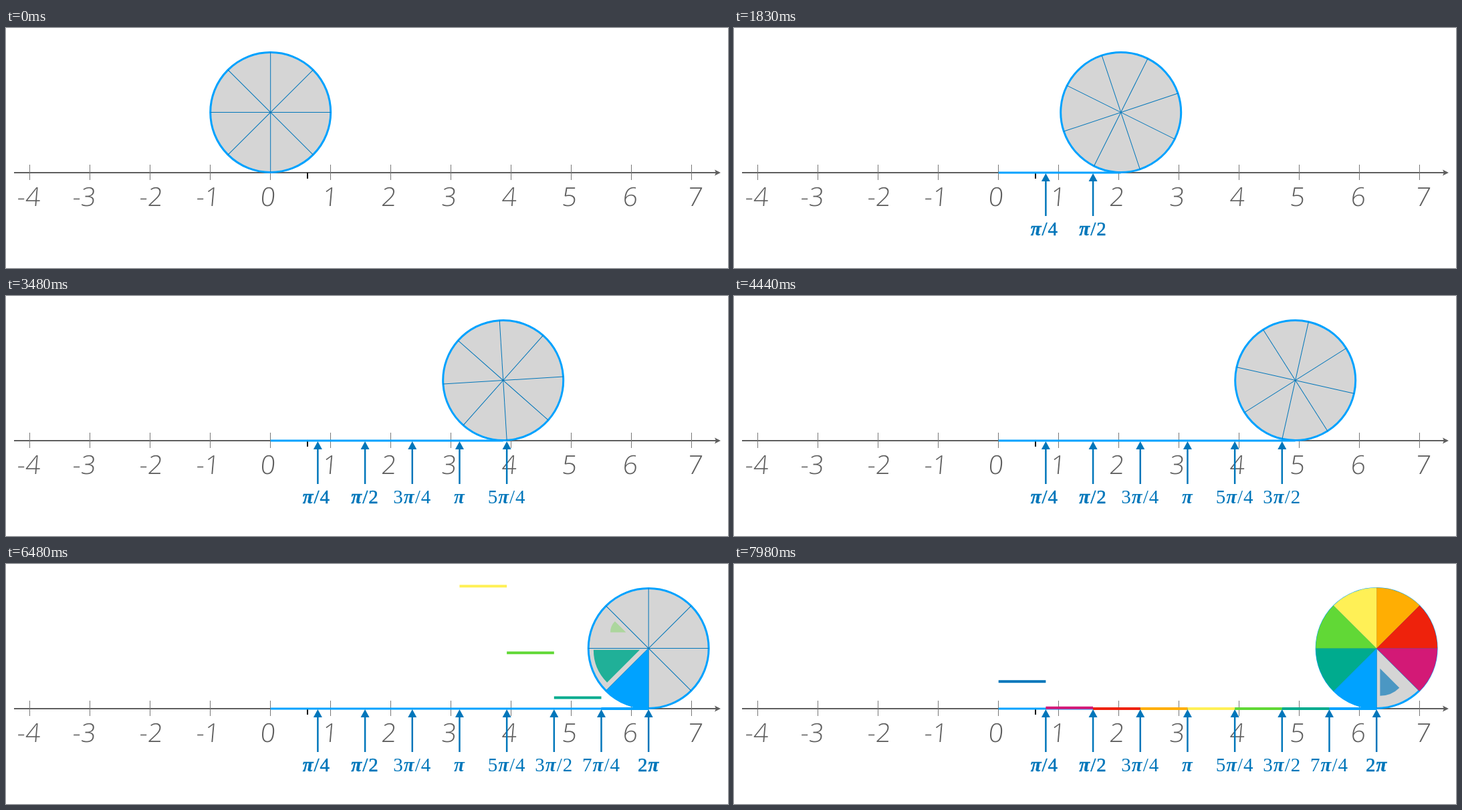
Write an HTML page that moves like this. It is 1080x360 px and loops after 8000 ms.

```html
<!DOCTYPE html>
<html lang="en">
<head>
<meta charset="utf-8">
<title>Unrolling a circle</title>
<style>
  html, body { margin: 0; width: 100%; height: 100%; overflow: hidden; background: #fff; }
  svg { display: block; width: 100%; height: 100%; }
  .num { font: 300 39px "Open Sans", sans-serif; fill: #5e5e5e; text-anchor: middle; }
  .label { font: 29px "Liberation Serif", serif; letter-spacing: 1px; text-anchor: middle; fill: #0076ba; }
  .label.strong { stroke: #0076ba; stroke-width: .5; }
  .pi { font-weight: bold; font-style: italic; }
</style>
</head>
<body>
<svg id="stage" viewBox="0 0 1080 360">
  <path d="M12 217H1062" stroke="#5e5e5e" stroke-width="2"/>
  <path d="M1069 217L1060 212.5L1062 217L1060 221.5Z" fill="#5e5e5e"/>
  <g id="scale"></g>
  <path d="M451 217V226" stroke="#000" stroke-width="2"/>
  <path id="trail" stroke="#00a2ff" stroke-width="3"/>
  <g id="wheel">
    <circle r="90" fill="#d5d5d5" stroke="#00a2ff" stroke-width="3"/>
    <g id="spokes" stroke="#0076ba" stroke-width="1"></g>
  </g>
  <g id="wedges"></g>
  <g id="bars"></g>
  <g id="arrows"></g>
</svg>
<script>
const LOOP = 8000, STEP = 30;
const ORIGIN = 395.7, RADIUS = 90, AXIS_Y = 217, HUB_Y = 126.5;
const ARC = RADIUS * Math.PI / 4, SPEED = 0.1;
const END_X = ORIGIN + 8 * ARC;
const STAGGER = 270, FIRST_LANDING = 6415;
const COLORS = ['#00a2ff', '#00ab8e', '#61d836', '#fff056', '#ffae03', '#ee220c', '#d41876', '#0076ba'];
const LABELS = ['π/4', 'π/2', '3π/4', 'π', '5π/4', '3π/2', '7π/4', '2π'];
const RISE = [47, 12, 42, 47, 47, 47, 47, 12];
// [ms before landing, wedge scale]
const POP = [[745, 0], [685, .07], [415, .31], [325, .45], [235, .67], [145, .94], [100, 1.12], [55, 1]];

const byId = id => document.getElementById(id);
const clamp = (v, lo = 0, hi = 1) => Math.min(hi, Math.max(lo, v));

function add(parent, tag, attrs, text) {
  const el = document.createElementNS('http://www.w3.org/2000/svg', tag);
  for (const name in attrs) el.setAttribute(name, attrs[name]);
  if (text) el.textContent = text;
  parent.append(el);
  return el;
}

// Number line
const numberX = [33, 116, 216, 301, 391, 484, 572, 662, 752, 842, 933, 1030];
numberX.forEach((x, i) => {
  add(byId('scale'), 'path', { d: `M${35.5 + 90 * i} 205V228`, stroke: '#777', 'stroke-width': 1 });
  add(byId('scale'), 'text', { class: 'num', transform: `translate(${x} 267) skewX(-5)` }, String(i - 4));
});

for (let a = 0; a < 180; a += 45)
  add(byId('spokes'), 'path', { d: `M0 ${-RADIUS}V${RADIUS}`, transform: `rotate(${a})` });

const arrows = LABELS.map((label, i) => {
  const x = ORIGIN + (i + 1) * ARC;
  const g = add(byId('arrows'), 'g', {});
  add(g, 'path', { d: `M${x} 228V282`, stroke: '#0076ba', 'stroke-width': 2.5 });
  add(g, 'path', { d: `M${x} 218l6.5 12h-13z`, fill: '#0076ba' });
  const strong = [0, 1, 7].includes(i) ? ' strong' : '';
  const text = add(g, 'text', { class: 'label' + strong, x: i ? x : x - 2, y: 311 });
  for (const part of label.split(/(π)/).filter(Boolean))
    add(text, 'tspan', part === 'π' ? { class: 'pi' } : {}, part);
  return g;
});

const HALF = Math.SQRT1_2 * 91;
const wedges = COLORS.map((fill, i) => {
  const g = add(byId('wedges'), 'g', { transform: `translate(${END_X} ${HUB_Y}) rotate(${90 + 45 * i})` });
  return add(g, 'path', { d: `M0 0H91A91 91 0 0 1 ${HALF} ${HALF}Z`, fill });
});

const bars = COLORS.map((stroke, i) =>
  add(byId('bars'), 'path', { d: `M${END_X - (i + 1) * ARC} 0h${ARC}`, stroke, 'stroke-width': 4 }));

function popScale(left) {
  if (left >= POP[0][0]) return 0;
  for (let i = 1; i < POP.length; i++) {
    const [t0, s0] = POP[i - 1], [t1, s1] = POP[i];
    if (left >= t1) return s0 + (s1 - s0) * (t0 - left) / (t0 - t1);
  }
  return 1;
}

function draw(t) {
  const x = Math.min(END_X, ORIGIN + SPEED * t);
  const angle = (x - ORIGIN) / RADIUS * 180 / Math.PI;
  byId('wheel').setAttribute('transform', `translate(${x} ${HUB_Y}) rotate(${angle})`);
  byId('trail').setAttribute('d', `M${ORIGIN} ${AXIS_Y}H${x}`);

  arrows.forEach((arrow, i) => {
    const start = (i + 1) * ARC / SPEED - 250;
    const p = clamp((t - start) / 130);
    arrow.setAttribute('visibility', t < start ? 'hidden' : 'visible');
    arrow.setAttribute('transform', `translate(0 ${RISE[i] * (1 - p) ** 2})`);
  });

  COLORS.forEach((_, i) => {
    const left = Math.max(0, FIRST_LANDING + STAGGER * i - t);
    const y = AXIS_Y - 400 * Math.sin(Math.min(left, 1500) / 1000) ** 2;
    bars[i].setAttribute('transform', `translate(0 ${y})`);

    const s = popScale(left), cx = 45.5, cy = HALF / 2;
    wedges[i].setAttribute('transform', `translate(${cx} ${cy}) scale(${s}) translate(${-cx} ${-cy})`);
    wedges[i].setAttribute('opacity', Math.cos(Math.PI / 2 * clamp(left / 800)) ** 2);
    wedges[i].setAttribute('visibility', s > 0 ? 'visible' : 'hidden');
  });
}

const begin = performance.now();
function tick() {
  const t = (performance.now() - begin) % LOOP;
  draw(Math.floor(t / STEP) * STEP);
  requestAnimationFrame(tick);
}
tick();
</script>
</body>
</html>
```
